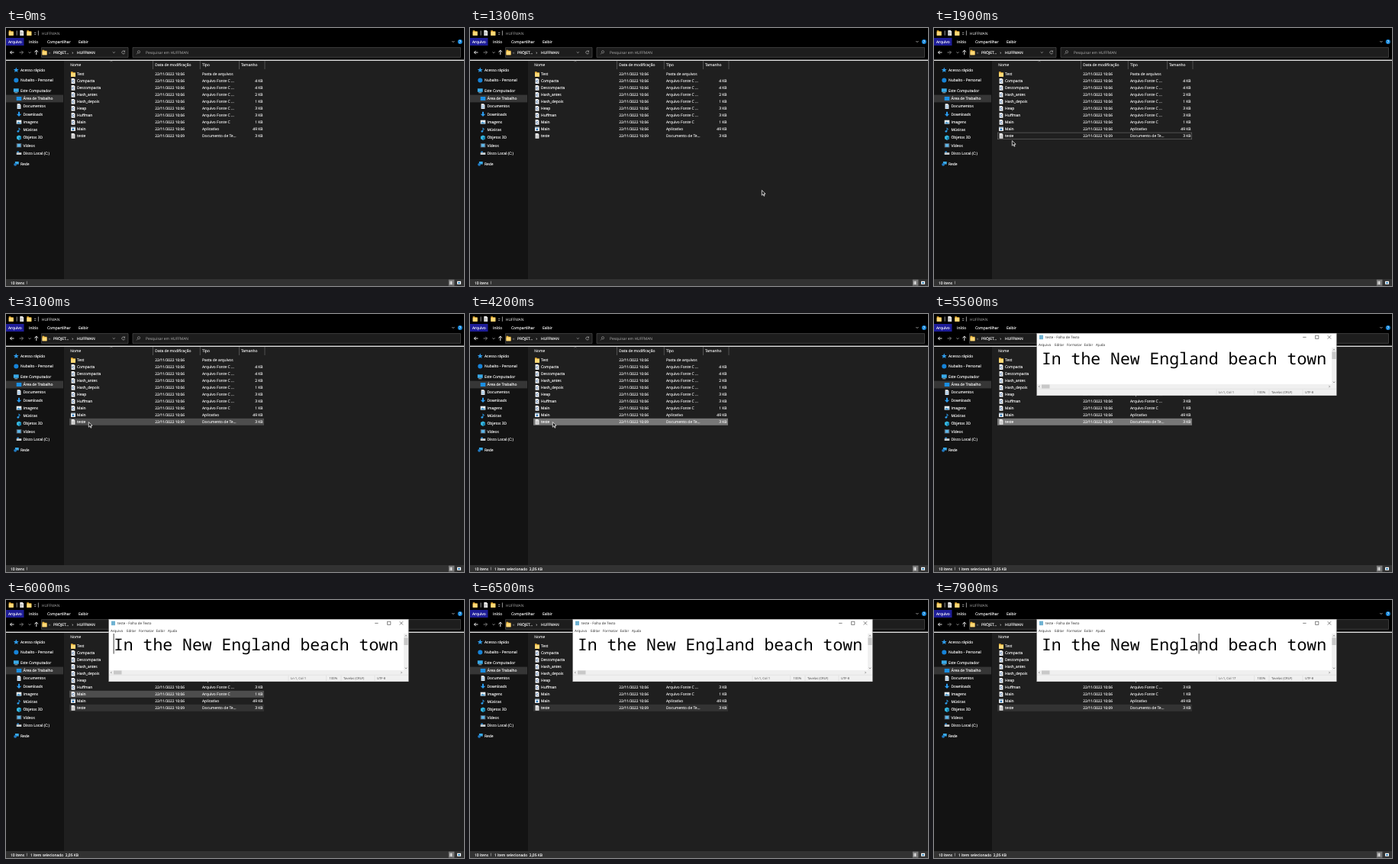
Write an HTML page that moves like this. It is 600x338 px and loops after 8000 ms.

```html
<!DOCTYPE html>
<html lang="pt">
<head>
<meta charset="utf-8">
<title>Explorador</title>
<style>
  html, body { margin: 0; width: 100%; height: 100%; overflow: hidden; background: #000; }
  svg { display: block; width: 100vw; height: 100vh; }
  text {
    font: 4.95px "Open Sans", "Noto Sans", sans-serif; white-space: pre; text-rendering: geometricPrecision;
    fill: #fff; stroke: #fff; stroke-width: .14px;
  }
  .dim { fill: #b4b4b4; stroke: none; }
  .head { fill: #eee; stroke: #eee; }
  .date { font-size: 4.75px; }
  .end { text-anchor: end; }
  .pad text { fill: #222; stroke: none; font-size: 4.5px; }
  .pad .status { font-size: 4.2px; fill: #444; }
  .pad .big { font: 21.45px "Noto Sans Mono", "DejaVu Sans Mono", monospace; fill: #000; }

  .anim { animation: 8s step-end infinite; }
  #title { animation-name: title; stroke: none; }
  #focus { animation-name: focus; }
  #teste { animation-name: teste; }
  #main { animation-name: main; }
  #app { animation-name: app; }
  #selected { animation-name: selected; }
  #pad { animation-name: pad; }
  #caret { animation-name: caret; }
  #col1 { animation-name: col1; }
  #col17 { animation-name: col17; }
  #cursor { animation-name: show, move; }

  @keyframes title { 0%, 60%, to { fill: #a8a8a8 } 18.75% { fill: #fff } }
  @keyframes focus { 0%, 27.5%, to { opacity: 0 } 18.75% { opacity: 1 } }
  @keyframes teste {
    0%, to { fill: #4d4d4d; opacity: 0 }
    27.5% { fill: #4d4d4d; opacity: 1 }
    52.5% { fill: #777; opacity: 1 }
    72.5% { fill: #333; opacity: 1 }
  }
  @keyframes app { 0%, 73.75%, to { opacity: 0 } 72.5% { opacity: 1 } }
  @keyframes main { 0%, 78.75%, to { opacity: 0 } 73.75% { opacity: 1 } }
  @keyframes selected { 0% { opacity: 0 } 52.5%, to { opacity: 1 } }
  @keyframes pad { 0% { opacity: 0 } 68.75%, to { opacity: 1 } }
  @keyframes caret {
    0%, 76.25% { opacity: 0; transform: none }
    70%, 82.5% { opacity: 1; transform: none }
    83.75% { opacity: 1; transform: translateX(206px) }
    90% { opacity: 0; transform: translateX(206px) }
    96.25%, to { opacity: 1; transform: translateX(206px) }
  }
  @keyframes col1 { 0% { opacity: 1 } 83.75%, to { opacity: 0 } }
  @keyframes col17 { 0% { opacity: 0 } 83.75%, to { opacity: 1 } }
  @keyframes show { 0%, 61.25%, to { opacity: 0 } 16.25% { opacity: 1 } }
  @keyframes move {
    0% { transform: translate(382px, 212px) }
    16.25% { transform: translate(382px, 212px); animation-timing-function: ease-in-out }
    23.75% { transform: translate(102px, 147px); animation-timing-function: linear }
    26.25% { transform: translate(104px, 146px); animation-timing-function: ease-out }
    28.75% { transform: translate(108px, 141px) }
    54% { transform: translate(108px, 141px); animation-timing-function: linear }
    56.25% { transform: translate(112px, 141px); animation-timing-function: linear }
    57.5%, to { transform: translate(108px, 141px) }
  }
</style>
</head>
<body>
<svg viewBox="0 0 600 338" xmlns="http://www.w3.org/2000/svg">
  <defs>
    <g id="folder"><path d="M-3-3.3h2.4l.8 1h2.8v5.6h-6z" fill="#e8b23a"/><path d="M-3-1.4h6v4.7h-6z" fill="#ffd977"/></g>
    <path id="doc" d="M-2.4-3.4h3.4l1.4 1.4v5.4h-4.8z" fill="#f4f4f4"/>
    <g id="source"><use href="#doc"/><path d="M1-.7a1.3 1.3 0 1 0 0 2" fill="none" stroke="#3568a8" stroke-width=".8"/></g>
    <g id="note"><use href="#doc"/><path d="M-1.5-1.3h3M-1.5 0h3M-1.5 1.3h3M-1.5 2.5h3" stroke="#8a8a8a" stroke-width=".5"/></g>
    <g id="program"><path d="M-3-2.6h6v5.2h-6z" fill="#f0f0f0"/><path d="M-3-2.6h6v1.2h-6z" fill="#9db8cc"/><path d="M-1.4-.6h2.6v2.2h-2.6z" fill="#2878c0"/></g>
    <path id="star" d="M0-3.4 1-1.1 3.4-.9 1.6.7 2.2 3.1 0 1.8-2.2 3.1-1.6.7-3.4-.9-1-1.1z" fill="#2f9bea"/>
    <circle id="disc" r="3" fill="#1683d8"/>
    <g id="screen"><path d="M-3.4-2.7h6.8v4.5h-6.8z" fill="#38a9e8"/><path d="M-2 2.8h4" stroke="#c8d8e0" stroke-width=".8"/></g>
    <path id="desk" d="M-3.3-2.5h6.6v5h-6.6z" fill="#1b8fe3"/>
    <g id="paper"><use href="#doc"/><path d="M-1.5-1h3M-1.5.5h3M-1.5 2h3" stroke="#3e8ed0" stroke-width=".6"/></g>
    <path id="down" d="M-1-3.2h2v3h2.2l-3.2 3.2-3.2-3.2h2.2z" fill="#2b9cf0"/>
    <g id="image"><path d="M-3.3-2.5h6.6v5h-6.6z" fill="#e6eef2"/><path d="M-2.8 2 -.8-.8.7 1 1.6 0 2.8 2z" fill="#3b92cc"/></g>
    <path id="music" d="M-.4-3.2c.6 1.4 2.6 1.3 2.4 3.5-.5-1-1.2-1.2-1.6-1.3v2.6c0 2.2-3 2.1-3 .5 0-1.2 1.2-1.6 2.2-1.2z" fill="#2da0f0"/>
    <g id="cube"><path d="M0-3.2 3-1.6v3.3l-3 1.6-3-1.6v-3.3z" fill="#35b5dd"/><path d="M0 0 3-1.6v3.3l-3 1.6z" fill="#1681ad"/></g>
    <g id="film"><path d="M-3.3-2.6h6.6v5.2h-6.6z" fill="#5c6f80"/><path d="M-2-1.9h4v3.8h-4z" fill="#5cb6e8"/></g>
    <g id="drive"><path d="M-3.3-.8h6.6v2.8h-6.6z" fill="#c7cdd1"/><path d="M-2.6-2.4h2.4v1.4h-2.4z" fill="#2b9cf0"/></g>
    <g id="net"><path d="M-1.4-2.8h4.8v3.6h-4.8z" fill="#38a9e8"/><circle cx="-1.2" cy="1" r="1.9" fill="#2179c2"/></g>
  </defs>

  <!-- explorer frame -->
  <rect width="600" height="338"/>
  <rect y="42" width="76" height="287" fill="#131313"/>
  <rect x="76" y="42" width="524" height="287" fill="#1f1f1f"/>
  <rect y="41.6" width="600" height="1.3" fill="#f2f2f2"/>
  <rect y="87.6" width="75" height="9.8" fill="#363636"/>
  <rect y="329" width="600" height="9" fill="#323232"/>
  <rect y="13" width="23.5" height="10" fill="#1e1d98"/>
  <g fill="none" stroke="#505050" stroke-width=".7">
    <path d="M46.5 25.6h113.5v12.8H46.5zM166 25.6h429.5v12.8H166z" fill="#1d1d1d"/>
    <path d="M192.5 43v11M254.3 43v11M305.5 43v11M339 43v11" stroke="#666"/>
  </g>
  <g fill="none" stroke="#fff" stroke-width=".9">
    <path d="M10.5 32H5.5M7.7 29.8 5.5 32l2.2 2.2M39.8 35v-5.7M37.4 31.5l2.4-2.3 2.4 2.3"/>
    <path d="M17.5 32h5M20.3 29.8l2.2 2.2-2.2 2.2M29.4 31.4l1.6 1.5 1.6-1.5" stroke="#888"/>
    <path d="M139.8 31.3l1.5 1.4 1.5-1.4M155.3 30.6a2 2 0 1 0 .4 2M155.6 29.5v1.6h-1.6" stroke="#ccc" stroke-width=".6"/>
    <path d="M136.4 44.2l1.5-1.2 1.5 1.2" stroke="#999" stroke-width=".5"/>
    <path d="M584.3 17l1.6 1.6 1.6-1.6M37 6.2h2.4M37.2 8l1 1 1-1M14.2 3.5v6.2M42.4 3.5v6.2" stroke-width=".6"/>
    <circle cx="174" cy="31.3" r="1.6" stroke="#aaa" stroke-width=".6"/>
    <path d="M172.8 32.5l-1.8 1.9" stroke="#aaa" stroke-width=".6"/>
  </g>
  <circle cx="594.8" cy="18" r="3" fill="#1688dc"/>
  <path d="M579.8 329.6h7.6v8h-7.6z" fill="#777"/>
  <path d="M581.5 331.7h1v4.2h-1zM583.2 331.7h1.1v4.2h-1.1zM591 331.8h5v4h-5z" fill="#fff"/>
  <path d="M592 333h3v1.7h-3z" fill="#3282b8"/>
  <path d="M27.4 331.6v4" stroke="#ccc" stroke-width=".6"/>
  <use href="#folder" x="6.7" y="6.5"/><use href="#note" x="20.7" y="6.5"/><use href="#folder" x="30.3" y="6.5"/>
  <use href="#folder" x="50.5" y="32"/>
  <text id="title" class="anim" x="46.8" y="8.6">HUFFMAN</text>
  <g id="labels"></g>
  <g id="selected" class="anim"><text x="32" y="335.6">1 item selecionado  2,05 KB</text></g>

  <!-- file list -->
  <g id="highlights">
    <rect id="teste" class="anim" x="83" y="136.8" width="255" height="9"/>
    <rect id="app" class="anim" x="83" y="127.8" width="255" height="9" fill="#4d4d4d"/>
    <rect id="main" class="anim" x="83" y="118.8" width="255" height="9" fill="#4d4d4d"/>
    <rect id="focus" class="anim" x="83.3" y="137.1" width="254.4" height="8.6" fill="none" stroke="#707070" stroke-width=".6"/>
  </g>
  <g id="files"></g>

  <!-- text editor -->
  <g id="pad" class="pad anim">
    <rect x="134.7" y="25.2" width="392.6" height="81.6" fill="#fff" stroke="#8b8b8b" stroke-width=".5"/>
    <path d="M521 44h6v54h-6zM135 92h392v14.6H135z" fill="#f0f0f0"/>
    <path d="M521.4 49.6h5.3v9.4h-5.3zM141 92.6h10.5v5H141z" fill="#c8c8c8"/>
    <path d="M135 98.2h392M370 99v7M419.5 99v7M439 99v7M483 99v7" stroke="#d4d4d4" stroke-width=".5"/>
    <path d="M522.7 47.5l1.3-1.2 1.3 1.2M522.7 88.7l1.3 1.2 1.3-1.2M138.5 93.9l-1.2 1.2 1.2 1.2M517.4 93.9l1.2 1.2-1.2 1.2" fill="none" stroke="#555" stroke-width=".6"/>
    <path d="M483.2 30.4h4.4M499.6 28.2h4.2v4.2h-4.2zM515.7 28.2l4.4 4.4M520.1 28.2l-4.4 4.4" fill="none" stroke="#222" stroke-width=".55"/>
    <rect x="138" y="27.6" width="5" height="5.6" fill="#6fb2d2"/>
    <text x="146" y="32">teste - Folha de Texto</text>
    <g id="menu"></g>
    <text class="big" x="141" y="66">In the New England beach town</text>
    <rect id="caret" class="anim" x="140.7" y="44" width=".8" height="26.5" fill="#111"/>
    <text id="col1" class="status anim" x="373" y="104.2">Ln 1, Col 1</text>
    <text id="col17" class="status anim" x="373" y="104.2">Ln 1, Col 17</text>
  </g>

  <path id="cursor" class="anim" d="M.3.6v6.6l1.6-1.5 1.1 2.5 1-.4L2.9 5.3h2.2z" fill="#111" stroke="#f4f4f4" stroke-width=".8"/>
</svg>
<script>
  const fill = (id, parts) => document.getElementById(id).innerHTML = parts.join('');
  const text = (x, y, s, cls = '') => `<text x="${x}" y="${y}" class="${cls}">${s}</text>`;
  const icon = (name, x, y) => `<use href="#${name}" x="${x}" y="${y}"/>`;

  const places = [
    ['star', 55, 'Acesso rápido'], ['disc', 68.5, 'Nubalto - Personal'], ['screen', 82, 'Este Computador'],
    ['desk', 92.5, 'Área de Trabalho', 1], ['paper', 102.7, 'Documentos', 1], ['down', 113, 'Downloads', 1],
    ['image', 123.2, 'Imagens', 1], ['music', 133.4, 'Músicas', 1], ['cube', 143.6, 'Objetos 3D', 1],
    ['film', 153.8, 'Vídeos', 1], ['drive', 164, 'Disco Local (C:)', 1], ['net', 177.8, 'Rede']
  ];
  fill('labels', [
    text(3, 19.9, 'Arquivo'), text(30, 19.9, 'Início'), text(54, 19.9, 'Compartilhar'), text(95, 19.9, 'Exibir'),
    text(55.5, 33.7, '‹‹', 'dim'), text(62, 33.7, 'PROJET...'), text(86.5, 33.6, '›'),
    text(93, 33.7, 'HUFFMAN'), text(183, 33.7, 'Pesquisar em HUFFMAN', 'dim'),
    text(593.7, 19.8, '?'), text(6, 335.6, '10 itens'),
    text(84.3, 50, 'Nome', 'head'), text(195.3, 50, 'Data de modificação', 'head'),
    text(257, 50, 'Tipo', 'head'), text(308, 50, 'Tamanho', 'head'),
    ...places.map(([name, y, label, child]) =>
      icon(name, child ? 17 : 13.3, y) + text(child ? 22.5 : 19, y + 1.7, label))
  ]);

  const source = 'Arquivo Fonte C ...';
  const files = [
    ['folder', 'Test', 'Pasta de arquivos'],
    ['source', 'Compacta', source, 4], ['source', 'Descompacta', source, 4],
    ['source', 'Hash_antes', source, 2], ['source', 'Hash_depois', source, 1],
    ['source', 'Heap', source, 3], ['source', 'Huffman', source, 3],
    ['source', 'Main', 'Arquivo Fonte C', 1], ['program', 'Main', 'Aplicativo', 49],
    ['note', 'teste', 'Documento de Te...', 3]
  ];
  fill('files', files.map(([name, label, kind, size], i) => {
    const y = 60.5 + i * 8.98, base = y + 1.8;
    return icon(name, 88, y) + text(93, base, label)
      + text(195.3, base, `22/11/2022 10:0${i === 9 ? 9 : 6}`, 'head date')
      + text(257, base, kind, 'head') + (size ? text(336.5, base, size + ' KB', 'head end') : '');
  }));

  fill('menu', [
    ...[[137, 'Arquivo'], [158, 'Editar'], [174, 'Formatar'], [196.5, 'Exibir'], [212, 'Ajuda']]
      .map(([x, s]) => text(x, 41.5, s)),
    ...[[423.5, '100%'], [442, 'Tavelas (CRLF)'], [486, 'UTF-8']].map(([x, s]) => text(x, 104.2, s, 'status'))
  ]);
</script>
</body>
</html>
```
